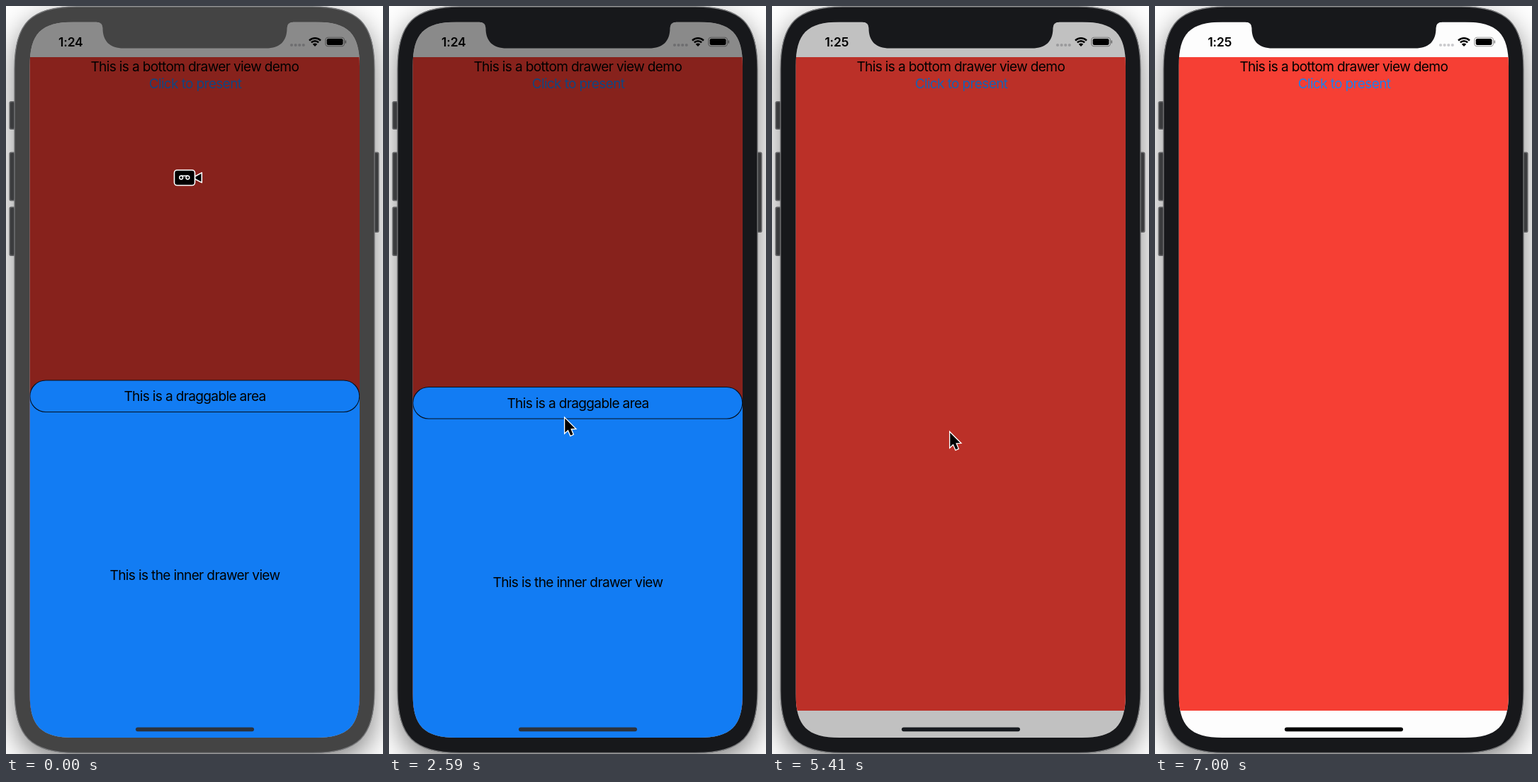
These frames come from a looping animation (532 by 1053 pixels, 8 s). An HTML page with a canvas:

```html
<!DOCTYPE html>
<html lang="en">
<head>
<meta charset="utf-8">
<title>Bottom drawer demo</title>
<style>
html, body { margin: 0; width: 100%; height: 100%; overflow: hidden; background: #fff; }
canvas { display: block; width: 532px; height: 1053px; }
</style>
</head>
<body>
<canvas id="stage"></canvas>
<script>
const W = 532, H = 1053, LOOP = 8000;
const canvas = document.getElementById('stage');
const ctx = canvas.getContext('2d');
const ratio = window.devicePixelRatio || 1;
canvas.width = W * ratio;
canvas.height = H * ratio;

const SCREEN = { x: 33.5, y: 22.5, w: 465.5, h: 1007.5 };
const BLUE = '#127cf3', RED = '#f63f34', WHITE = '#fdfdfd';
const FONT = 'Inter, "Open Sans", sans-serif';
const DISMISS = 4940, GONE = 5650;

// time, x, y of the pointer tip
const POINTER = [
  [60, 245, 255], [450, 256, 410], [820, 235, 550], [1240, 235, 550],
  [1420, 240, 586], [1720, 245, 576], [2000, 246, 568],
  [2060, 246, 568], [2330, 247, 598], [2590, 247, 578], [2820, 247, 568],
  [2880, 247, 568], [3080, 247, 596], [3290, 247, 568],
  [3530, 247, 568], [3650, 247, 580], [3820, 247, 568],
  [4060, 247, 568], [4420, 249, 608], [4820, 250, 597], [4940, 250, 599],
  [5530, 250, 598], [5880, 250, 598], [6250, 272, 104], [6650, 224, 976],
  [6700, 224, 976], [6760, 206, 1013]
];

function pointerAt(t) {
  let i = 0;
  while (i < POINTER.length - 1 && POINTER[i + 1][0] <= t) i++;
  const a = POINTER[i], b = POINTER[i + 1] || a;
  const u = b === a ? 0 : Math.max(0, (t - a[0]) / (b[0] - a[0]));
  const s = u * u * (3 - 2 * u);
  return { x: a[1] + (b[1] - a[1]) * s, y: a[2] + (b[2] - a[2]) * s };
}

function dismissAt(t) {
  const u = Math.min(1, Math.max(0, (t - DISMISS) / (GONE - DISMISS)));
  return Math.pow(u, 1.8);
}

// The drawer follows the pointer once the drag has passed its threshold.
function drawerShift(t) {
  const tm = Math.min(t, DISMISS);
  if (tm < 1240) return 0;
  const drag = Math.max(0, pointerAt(tm).y - (tm < 4060 ? 568.5 : 576));
  return drag + dismissAt(t) * 1008;
}

function roundRect(x, y, w, h, r) {
  ctx.beginPath();
  ctx.roundRect(x, y, w, h, r);
}

function fillRound(x, y, w, h, r, color) {
  roundRect(x, y, w, h, r);
  ctx.fillStyle = color;
  ctx.fill();
}

// Rounded box with continuous corners; e is the corner's reach.
function softBox(x, y, w, h, e) {
  const c = e * 0.26, r = x + w, b = y + h;
  ctx.beginPath();
  ctx.moveTo(x + e, y);
  ctx.lineTo(r - e, y);
  ctx.bezierCurveTo(r - c, y, r, y + c, r, y + e);
  ctx.lineTo(r, b - e);
  ctx.bezierCurveTo(r, b - c, r - c, b, r - e, b);
  ctx.lineTo(x + e, b);
  ctx.bezierCurveTo(x + c, b, x, b - c, x, b - e);
  ctx.lineTo(x, y + e);
  ctx.bezierCurveTo(x, y + c, x + c, y, x + e, y);
  ctx.closePath();
}

function label(text, x, y, color = '#000', size = 19.1, weight = 400, gap = -0.66) {
  ctx.font = `${weight} ${size}px ${FONT}`;
  ctx.letterSpacing = gap + 'px';
  ctx.textAlign = 'center';
  ctx.fillStyle = color;
  ctx.fillText(text, x, y);
}

function sideButton(x, y, h) {
  fillRound(x, y, 9, h, 2.5, '#626365');
  fillRound(x + 1.5, y + 1.5, 6, h - 3, 2, '#3b3c3e');
}

function phoneBody(color) {
  ctx.fillStyle = '#fff';
  ctx.fillRect(0, 0, W, H);
  ctx.save();
  ctx.shadowColor = 'rgba(0,0,0,0.5)';
  ctx.shadowBlur = 40 * ratio;
  ctx.shadowOffsetY = 14 * ratio;
  softBox(12, 1, 508, 1050.5, 88);
  ctx.fillStyle = color;
  ctx.fill();
  ctx.restore();
  sideButton(4.5, 134, 40);
  sideButton(4.5, 205.5, 69);
  sideButton(4.5, 282.5, 69.5);
  sideButton(517.5, 205.5, 113.5);
  softBox(12, 1, 508, 1050.5, 88);
  ctx.fillStyle = color;
  ctx.fill();
  ctx.strokeStyle = '#77787a';
  ctx.lineWidth = 1.3;
  ctx.stroke();
}

function notch(color) {
  ctx.beginPath();
  ctx.moveTo(128, 20);
  ctx.lineTo(128, 22.5);
  ctx.quadraticCurveTo(136.5, 23, 136.5, 31);
  ctx.bezierCurveTo(136.5, 50, 147, 59.5, 166, 59.5);
  ctx.lineTo(367, 59.5);
  ctx.bezierCurveTo(386, 59.5, 396.5, 50, 396.5, 31);
  ctx.quadraticCurveTo(396.5, 23, 405, 22.5);
  ctx.lineTo(405, 20);
  ctx.fillStyle = color;
  ctx.fill();
}

function wifi() {
  const cx = 436, cy = 56.5, a = Math.PI / 4;
  ctx.strokeStyle = '#000';
  ctx.lineWidth = 2.5;
  for (const r of [11.3, 7.3]) {
    ctx.beginPath();
    ctx.arc(cx, cy, r, -Math.PI / 2 - a, -Math.PI / 2 + a);
    ctx.stroke();
  }
  ctx.beginPath();
  ctx.moveTo(cx, cy + 0.5);
  ctx.arc(cx, cy + 0.5, 4.6, -Math.PI / 2 - a, -Math.PI / 2 + a);
  ctx.fillStyle = '#000';
  ctx.fill();
}

function statusIcons(t) {
  label(t < 4480 ? '1:24' : '1:25', 91.3, 57, '#000', 17.5, 600, -0.2);
  wifi();
  roundRect(450.8, 44.2, 26.6, 12.6, 3.7);
  ctx.strokeStyle = 'rgba(0,0,0,0.4)';
  ctx.lineWidth = 1.1;
  ctx.stroke();
  fillRound(452.7, 46, 22.8, 9, 2.2, '#000');
  fillRound(478.5, 48.3, 1.6, 4.4, 0.8, 'rgba(0,0,0,0.45)');
}

function page(dim) {
  const { x, y, w, h } = SCREEN;
  ctx.fillStyle = WHITE;
  ctx.fillRect(x, y, w, h);
  ctx.fillStyle = RED;
  ctx.fillRect(x, 72, w, 920);
  label('This is a bottom drawer view demo', 266.3, 91.5);
  label('Click to present', 267, 116, '#1f7fea');
  ctx.fillStyle = '#cacacd';
  for (let i = 0; i < 4; i++) {
    ctx.beginPath();
    ctx.arc(403 + i * 5.6, 55, 2.1, 0, Math.PI * 2);
    ctx.fill();
  }
  ctx.fillStyle = `rgba(0,0,0,${dim})`;
  ctx.fillRect(x, y, w, h);
}

function drawer(shift) {
  const top = 527 + shift, { x, w } = SCREEN;
  if (top > H) return;
  fillRound(x, top, w, 1100, [22.3, 22.3, 0, 0], BLUE);
  roundRect(x + 0.3, top, w - 0.6, 44.5, 22.2);
  ctx.strokeStyle = '#04101f';
  ctx.lineWidth = 1.1;
  ctx.stroke();
  label('This is a draggable area', 266.5, 556.3 + shift);
  label('This is the inner drawer view', 266.5, 808.3 + shift);
}

function arrow({ x, y }) {
  ctx.save();
  ctx.translate(x + 1.3, y + 2.6);
  ctx.beginPath();
  ctx.moveTo(0, 0);
  for (const [px, py] of [[0, 20], [4.5, 15.8], [8, 23.8], [11.3, 22.3], [8, 14.5], [14.2, 14.2]]) {
    ctx.lineTo(px, py);
  }
  ctx.closePath();
  ctx.strokeStyle = '#fff';
  ctx.lineWidth = 2.6;
  ctx.lineJoin = 'miter';
  ctx.stroke();
  ctx.fillStyle = '#000';
  ctx.fill();
  ctx.restore();
}

function cameraPointer() {
  ctx.strokeStyle = '#fff';
  ctx.fillStyle = '#000';
  ctx.lineWidth = 1.6;
  ctx.lineJoin = 'round';
  ctx.beginPath();
  ctx.moveTo(266.5, 240);
  ctx.lineTo(276.3, 234.6);
  ctx.lineTo(276.3, 248.6);
  ctx.lineTo(266.5, 243.5);
  ctx.closePath();
  ctx.fill();
  ctx.stroke();
  roundRect(237.5, 231, 29, 21.5, 4);
  ctx.fill();
  ctx.stroke();
  ctx.lineWidth = 1.5;
  for (const cx of [247.2, 256.4]) {
    ctx.beginPath();
    ctx.arc(cx, 241.5, 2.4, 0, Math.PI * 2);
    ctx.stroke();
  }
  ctx.beginPath();
  ctx.moveTo(247.2, 239.1);
  ctx.lineTo(256.4, 239.1);
  ctx.stroke();
}

function draw(t) {
  const bezel = t < 60 ? '#444444' : '#17181b';
  const gone = dismissAt(t);
  ctx.setTransform(ratio, 0, 0, ratio, 0, 0);
  phoneBody(bezel);

  ctx.save();
  softBox(SCREEN.x, SCREEN.y, SCREEN.w, SCREEN.h, 62);
  ctx.clip();
  page(0.455 * (1 - gone));
  if (t < GONE) drawer(drawerShift(t));
  statusIcons(t);
  const g = 1 - gone;
  fillRound(183, 1015.5, 167, 5.7, 2.85, `rgb(${44 * g},${50 * g},${60 * g})`);
  ctx.restore();
  notch(bezel);

  if (t < 60) cameraPointer();
  else if (t < 7000) arrow(pointerAt(t));
}

const start = performance.now();
function tick() {
  draw((performance.now() - start) % LOOP);
  requestAnimationFrame(tick);
}
tick();
</script>
</body>
</html>
```
